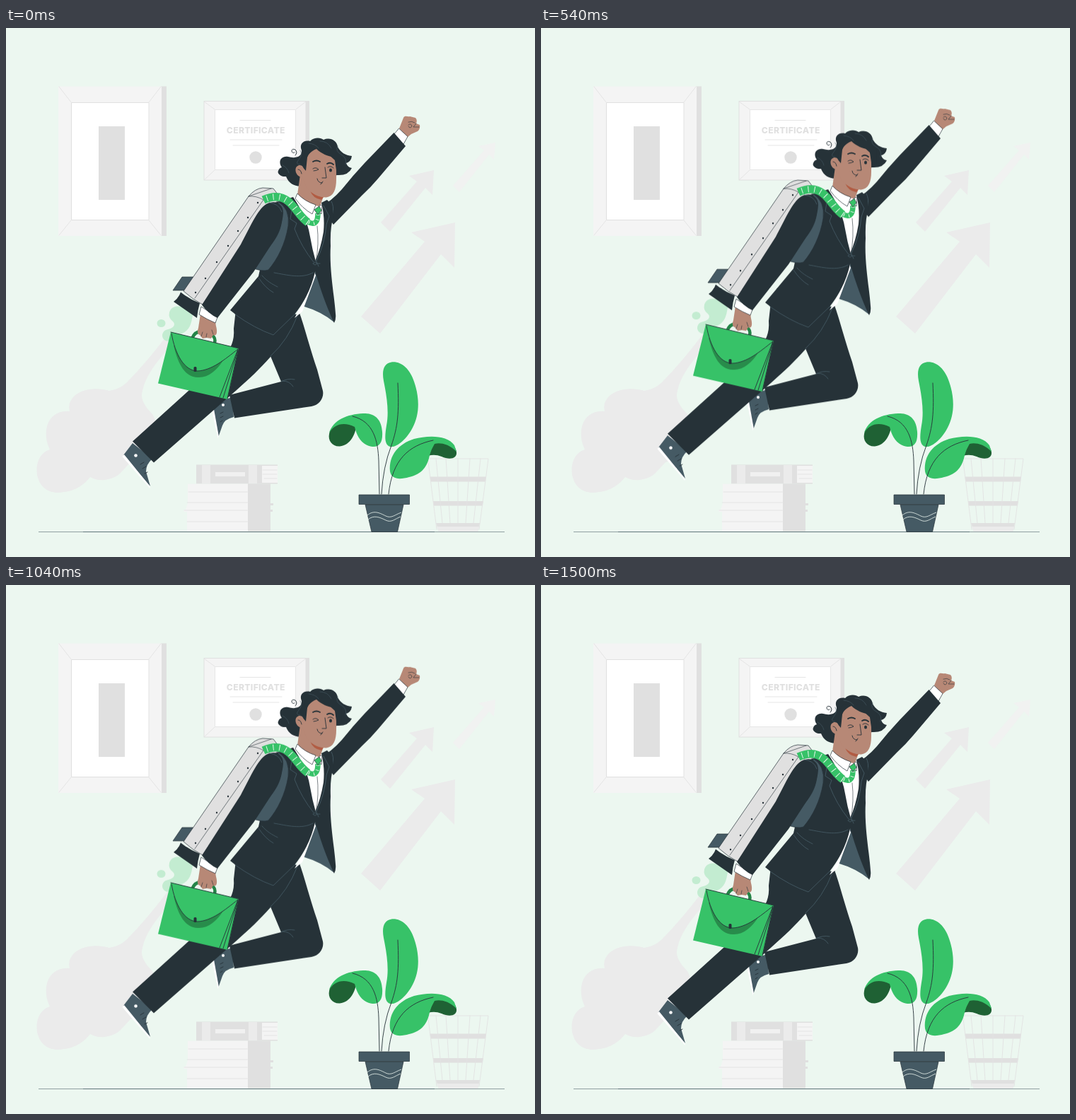
An HTML page that plays this animation: 748x748 px, repeating every 1.54 s.

```html
<!DOCTYPE html>
<html lang="en">
<head>
<meta charset="utf-8">
<title>Taking off</title>
<style>
  html, body { margin: 0; width: 100%; height: 100%; overflow: hidden; background: #ecf7f0; }
  svg { display: block; width: 100vw; height: 100vh; }
  .dark { fill: #263238; }
  .slate { fill: #455a64; }
  .green { fill: #37c268; }
  .deep { fill: #1f6134; }
  .skin { fill: #b78876; }
  .white { fill: #fff; }
  .g1 { fill: #f4f4f4; }
  .g2 { fill: #ebebeb; }
  .g3 { fill: #e0e0e0; }
  .ink, .seam, .pale { fill: none; stroke-linecap: round; stroke-linejoin: round; }
  .ink { stroke: #263238; stroke-width: .9; }
  .seam { stroke: #455a64; stroke-width: .9; }
  .pale { stroke: #e3e3e3; stroke-width: .9; }
  .edge { stroke: #263238; stroke-width: .7; stroke-linejoin: round; }
  .thin { stroke-width: .6; }
  .brow { stroke-width: 1.8; }
  .title { font: 800 12.2px Inter, "Open Sans", sans-serif; letter-spacing: .3px; fill: #e0e0e0; }
  #flyer { animation: float 1540ms linear infinite; }
  @keyframes float {
    0%, 97.403%, 100% { transform: translateY(0); }
    48.701% { transform: translateY(-15px); }
  }
</style>
</head>
<body>
<svg viewBox="0 0 748 748">
  <g id="picture">
    <path class="g3" d="M219 82.500H227V294H219Z"/>
    <path class="g1" d="M74 82.500H220V294H74Z"/>
    <path class="white" stroke="#e0e0e0" d="M92.500 105.500H202V271.500H92.500Z"/>
    <path class="pale" d="M75 83L92 105M219 83L202 105M75 293L92 272M219 293L202 272"/>
    <path class="g3" d="M131 139H168V243H131Z"/>
  </g>

  <g id="certificate">
    <path class="g3" d="M423 103H429V215.500H423Z"/>
    <path class="g1" stroke="#e0e0e0" d="M280 103.500H424V215H280Z"/>
    <path class="white" stroke="#e6e6e6" d="M295.500 115.500H409.500V200.500H295.500Z"/>
    <path class="pale" d="M280 104L295 115M424 104L410 115M280 215L295 201M424 215L410 201M331 130.500H374M317 158H390M321 166H386"/>
    <text class="title" x="353.300" y="149.300" text-anchor="middle">CERTIFICATE</text>
    <circle class="g3" cx="353" cy="183" r="8.700"/>
  </g>

  <g id="arrows">
    <path class="g2" d="M635 275L573 289L592 302L502 408L529 432L615 320L634 339Z"/>
    <path class="g2" d="M605 201L570 209L581 217L530 275L543 288L593 226L603 236Z"/>
    <path fill="#f1f2f1" d="M692 162L668 167L676 173L632 223L641 232L683 179L690 186Z"/>
  </g>

  <path id="trail" class="g2" d="M234 426C214 453 190 482 170 502Q160 511 146 513C126 507 105 511 95 522Q87 531 90 542C74 540 62 549 58 563Q54 580 62 596C46 601 42 618 44 632C48 652 64 660 82 656C99 655 112 644 119 635C133 643 154 639 164 627L176 614C196 610 211 593 212 570Q213 555 207 546Q191 530 192 518C196 490 220 462 246 437Z"/>

  <g id="books">
    <path class="g3" d="M269 617.500H384V619H362V643H384V644.500H269Z"/>
    <path class="g1" d="M362 619H384V643H362Z"/>
    <path class="pale" d="M363 625H383M363 631H383M365 637H383"/>
    <path class="g2" d="M277 618H289V644H277ZM343 618H355V644H343Z"/>
    <path fill="#f0f0f0" d="M296 628H338V634H296Z"/>
    <path class="g3" d="M342 644.500H374V672H378V675H374V681H377V684H374V711.500H342Z"/>
    <path class="g1" d="M257 644.500H342V711.500H256V684H251.500V681H254L257 672Z"/>
    <path class="pale" d="M258 656H342M256 671H342M252 682H342M256 698H342"/>
  </g>

  <g id="bin">
    <path class="g3" d="M599.500 634.500H679L678 641.500H600.500ZM604 669H675L674 675.500H605ZM608 700H670L667 712H612Z"/>
    <path class="g2" d="M609 705H669L667 712H612Z"/>
    <path class="pale" d="M596.500 609H682L669 709M596.500 609L609 709M608 609L617 700M622 609L628 700M639 609V700M656 609L650 700M671 609L661 700"/>
  </g>

  <path d="M46 712.500H705" stroke="#455a64" opacity=".55"/>
  <path d="M109 712.500H606" stroke="#455a64" opacity=".6"/>

  <g id="plant">
    <path class="deep" d="M457 574C459 561 472 553 496 558C495 574 487 590 472 591.500C461 592 455 583 457 574Z"/>
    <path class="deep" d="M608 582C626 581 636 590 637 600C638 609 627 611 616 606Q606 602 597 605Z"/>
    <path class="green" d="M545 472.500C559 471 571 482 577 500C585 523 585 546 575 565C567 581 552 594 543 592C534 589 536 575 538 562C542 542 538 519 534 499C531 483 535 474 545 472.500Z"/>
    <path class="green" d="M457 573C462 554 483 546 505 545C522 544 531 554 532 571C533 586 528 593 518 592C502 590 496 576 493 564C478 556 463 560 457 573Z"/>
    <path class="green" d="M543 627C541 604 555 588 577 581C596 576 624 575 634 590L637 599C626 588 614 586 606 588Q601 596 599 604C596 620 588 631 570 635C556 639 545 638 543 627Z"/>
    <path class="ink" d="M554 502C556 544 554 564 545 590Q533 621 531 659M490 549C520 556 526 584 527 612L528 659M604 583C570 590 546 610 541 659"/>
    <path class="slate edge" d="M508 674H562L553.500 712.500H517Z"/>
    <path class="slate edge" d="M499 660H570.500V673.500H499Z"/>
    <path d="M511 689C520 681 529 686 537 690S550 688 559 685M512 695C520 688 529 692 537 696S550 694 558 691" fill="none" stroke="#ecf7f0" stroke-width=".8"/>
  </g>

  <g id="flyer">
    <g id="puff" fill="#c3ecd1">
      <path d="M231 402C234 393 242 393 249 394C260 390 265 397 264 406C262 418 260 427 249 432C240 436 239 443 230 443C220 443 218 431 226 427C236 425 241 420 236 415Q229 410 231 402Z"/>
      <ellipse cx="219.500" cy="417.500" rx="6" ry="5.500"/>
    </g>

    <g id="raised-arm">
      <path class="skin" d="M556 142L562 127C564 123 568 126 571 125L579 127Q582 130 580 135L585 137Q586 143 582 146L573 150L567 155Z"/>
      <path class="ink thin" d="M569 133Q574 131 578 134M569 137Q573 134 574 139Q571 143 569 139M580 135L576 140H584"/>
      <path class="white edge" d="M555.500 142L568 153.500L561 166L549 150Z"/>
      <path class="dark" d="M548.500 148L565 167L526 213Q516 225 503 237L463 278L445 252Q459 246 475 228Q491 208 507 191Z"/>
      <path class="seam" d="M460 245Q464 252 462 262"/>
    </g>

    <g id="back-leg">
      <path class="slate" d="M293 540L300 528L320 522L322 550Q309 553 306 562L300 579Z"/>
      <path class="white" d="M291 540L294 539L301 578L299.500 580Z"/>
      <circle class="white" cx="307" cy="533" r="2"/>
      <path class="ink" d="M303 545L307 543M303 551L307 549M303 557L306 555"/>
      <path class="dark" d="M390 420L415 403C422 422 430 454 440 483L448 513C450 523 443 533 432 535L323 551.500L316 519L389 500L374 464Z"/>
      <path class="seam" d="M389 500Q398 495 408 497M391 499Q401 499 406 507"/>
    </g>

    <g id="front-leg">
      <path class="slate" d="M179 587L207 609Q198 617 198 627L204 648L166 604Z"/>
      <path class="white" d="M167 603L203.500 648V651L164.500 606Z"/>
      <circle class="white" cx="183.500" cy="604.500" r="2.300"/>
      <path class="ink" d="M190 617L195 614M193 623L198 620M196 630L200 628"/>
      <path class="dark" d="M325 398L413 405C404 431 390 451 374 465C358 483 345 495 326 512L209 614.500L179 584.500L258 513L307 465Q324 449 322 425Z"/>
      <path class="seam" d="M412 407Q399 441 374 464"/>
    </g>

    <g id="torso">
      <path class="slate" d="M438 343L464 416Q446 401 420.500 393.500Z"/>
      <path class="white" d="M436 345L421 387L408 410L419 401L438 350Z"/>
      <path class="white" d="M407 239L426 236L447 250L456 270L450 300L438 333L414 295Z"/>
      <path class="ink thin" d="M440 280Q443 305 438 332"/>
      <path class="dark" d="M380 247L406 239C418 257 427 275 430 295Q433 313 438 330L437 345C430 376 413 407 378 434C356 427 333 412 317 399L357 351L366 310Z"/>
      <path class="dark" d="M446 247L454 243Q463 250 463 267Q458 282 459 308C457 342 464 376 466 404Q467 412 464 417Q450 388 437 344L437 330Q445 312 449 288Q451 267 446 247Z"/>
      <path class="seam" d="M406 246L402 270L411 276L408 284Q418 310 435 331M449 251L457 266L453 278Q451 305 439 329M434 333H444M438 328L442 337M434 346C418 355 397 349 379 346M362 350C369 358 376 362 384 366M357 353Q367 368 378 374M324 405Q352 425 378 434L409 404"/>
      <circle cx="437" cy="333" r="2" class="dark" stroke="#455a64" stroke-width=".8"/>
    </g>

    <g id="jetpack">
      <path class="slate edge" d="M384 245Q402 255 399 280C395 305 384 327 371 342Q363 345 347 339L362 320C378 305 393 285 389 262Z"/>
      <path class="slate edge" d="M236 371L249 352H265L253 371Z"/>
      <path class="g3 edge" d="M251 372L343 238Q352 227 363 226L378 227L388 240L367 262L278 391Q264 384 251 372Z"/>
      <path class="ink thin" d="M343 238Q354 237 364 243L267 382M343 238L375 227"/>
      <g class="dark">
        <circle cx="356" cy="247" r="1.200"/><circle cx="342" cy="268" r="1.200"/>
        <circle cx="328" cy="287" r="1.200"/><circle cx="314" cy="308" r="1.200"/>
        <circle cx="298" cy="331" r="1.200"/><circle cx="282" cy="354" r="1.200"/>
        <circle cx="268" cy="374" r="1.200"/>
      </g>
      <path class="dark" d="M247 373.500Q260 384 274 389Q271 399 270 410L237 387Q244 382 247 373.500Z"/>
    </g>

    <g id="briefcase">
      <path d="M263 439Q268 427 279 430L291 434Q297 438 295 446" fill="none" stroke="#238447" stroke-width="4.500"/>
      <path class="green" d="M233 430L329 453L313 525L215 502.500Z"/>
      <path fill="#288c4b" d="M237 449C244 477 253 493 271 494C286 495 298 484 307 470Z"/>
      <path class="green" d="M233 430L329 453C309 469 291 484 271 485C252 485 239 461 233 430Z"/>
      <path class="ink" d="M233 430L329 453M234 432C239 461 252 485 271 485C291 484 309 469 328 454M328 454L302 522M328 455L307 523M328 456L313 524"/>
      <rect class="dark" x="265.500" y="479" width="4" height="7" rx="1.500"/>
    </g>

    <g id="near-arm">
      <path class="skin" d="M275 404L297 413C295 420 299 424 298 431Q297 436 293 434L290 439L284 438L278 439L274 434Q269 432 272 424Z"/>
      <path class="ink thin" d="M278 430L276 436M284 432L283 437M291 427L293 433"/>
      <path class="white edge" d="M276 394L299 409L296 417Q284 412 273 405Z"/>
      <path class="dark" d="M277 391.500L332 306C344 284 355 257 368 249C381 242 392 249 392 261C391 277 386 289 378 302L350 345Q324 378 299 410Q286 404 277 391.500Z"/>
      <path class="seam" d="M372 247Q386 248 390 260"/>
    </g>

    <g id="head">
      <path class="dark" d="M424 222C414 226 401 223 396 210C388 211 383 205 385 202Q386 198 390 197C384 189 389 180 399 182C409 185 419 182 418 173C414 164 421 158 430 160C436 154 445 155 449 158C458 154 468 159 469 168C473 176 480 180 489 181Q488 189 481 191Q483 197 489 198Q484 209 468 208Z"/>
      <path class="skin" d="M417 200L412 236C418 245 434 252 444 252L449 238Z"/>
      <path fill="#b15c43" d="M430 230Q438 238 449 239L446 243Q434 241 430 230Z"/>
      <path class="skin" d="M424 190C424 181 431 174 439 171C446 178 455 181 464 183C468 192 467 202 467 214C467 229 463 238 453 239.500C443 240 433 235 425 226L419 211C411 211 407 201 411 196C416 191 421 196 423 200Z"/>
      <path class="dark" d="M439 170Q428 175 426 183L424 202Q420 198 419 195L419 181L427 169ZM438 170Q451 173 465 187L468 208L475 203L474 180L462 169Z"/>
      <path class="seam thin" d="M428 163Q438 164 442 170M444 160Q455 160 460 170M469 167Q465 174 474 179T480 193M416 173Q420 179 414 186T416 193M391 194Q398 197 400 205"/>
      <path class="ink" d="M409 180Q413 176 409 172Q404 170 404 174Q405 178 408 176"/>
      <path class="ink brow" d="M434 189Q439 186 444 189M454 192Q459 189 463 193"/>
      <path class="ink" d="M434 199Q438 196 442 200Q438 202 435 202M455 197Q459 194 463 198M451 197L453 212L447 212M440 213Q441 219 447 219M445 221L448 217M413 200Q417 200 418 206"/>
      <ellipse class="dark" cx="459" cy="201" rx="2" ry="2.500"/>
    </g>

    <g id="tie" fill="none">
      <path class="white edge" d="M412 234Q422 245 438 250L433 263Q419 255 409 241ZM443 251L447 250L446 263L440 257Z"/>
      <path d="M364 243C377 237 389 237 399 245C411 255 415 267 427 275" stroke="#37c268" stroke-width="11.500"/>
      <path d="M424 272Q441 284 441 262" stroke="#37c268" stroke-width="7.500"/>
      <path d="M364 243C377 237 389 237 399 245C411 255 415 267 427 275" stroke="#e5f7eb" stroke-width="8.500" stroke-dasharray="1 8" stroke-dashoffset="-5"/>
      <path d="M424 272Q441 284 441 262" stroke="#e5f7eb" stroke-width="5" stroke-dasharray="1 6" stroke-dashoffset="-5"/>
      <path class="green edge" d="M436 257L443 252L446 258L441 264Z"/>
    </g>
  </g>
</svg>
</body>
</html>
```
